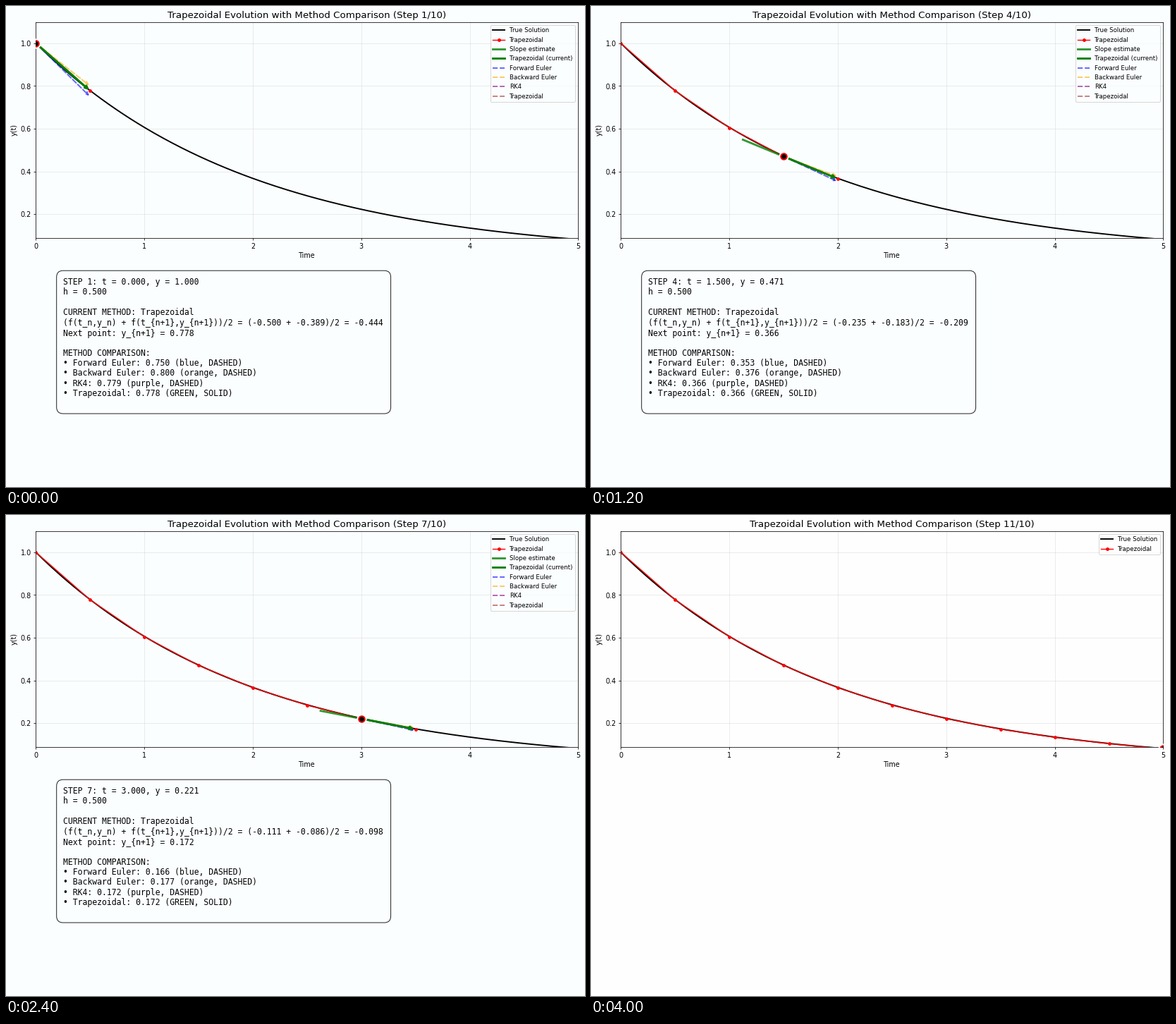
Write a matplotlib script that moves like this. It is 821 px wide and 682 px high and loops after 4400 ms.

```python
import numpy as np
import matplotlib.pyplot as plt
from matplotlib.animation import FuncAnimation
from matplotlib.patches import FancyBboxPatch

W, H, DPI = 821, 682, 69
STEPS, STEP_H = 10, 0.5
LEFT, RIGHT, TOP, BOTTOM = 42.4, 811.4, 22.6, 328.9

plt.rcParams.update({"font.family": "DejaVu Sans", "font.size": 10})

z = -0.5 * STEP_H
GROWTH = {
    "Forward Euler": 1 + z,
    "Backward Euler": 1 / (1 - z),
    "RK4": 1 + z + z**2 / 2 + z**3 / 6 + z**4 / 24,
    "Trapezoidal": (1 + z / 2) / (1 - z / 2),
}
COLORS = {"Forward Euler": "blue", "Backward Euler": "orange",
          "RK4": "purple", "Trapezoidal": "brown"}

times = STEP_H * np.arange(STEPS + 1)
values = GROWTH["Trapezoidal"] ** np.arange(STEPS + 1)
fine_t = np.linspace(0, 5, 300)

fig = plt.figure(figsize=((W + 0.01) / DPI, (H + 0.01) / DPI), dpi=DPI)
ax = fig.add_axes([LEFT / W, 1 - BOTTOM / H, (RIGHT - LEFT) / W, (BOTTOM - TOP) / H])
panel = fig.add_axes([0, 0, 1, 1])


def slope(y):
    return -0.5 * y


def report(n):
    t, y, y_next = times[n], values[n], values[n + 1]
    f0, f1 = slope(y), slope(y_next)
    lines = [
        f"STEP {n + 1}: t = {t:.3f}, y = {y:.3f}",
        f"h = {STEP_H:.3f}",
        "",
        "CURRENT METHOD: Trapezoidal",
        f"(f(t_n,y_n) + f(t_{{n+1}},y_{{n+1}}))/2 = ({f0:.3f} + {f1:.3f})/2 = {(f0 + f1) / 2:.3f}",
        f"Next point: y_{{n+1}} = {y_next:.3f}",
        "",
        "METHOD COMPARISON:",
    ]
    for name, growth in GROWTH.items():
        style = "GREEN, SOLID" if name == "Trapezoidal" else f"{COLORS[name]}, DASHED"
        lines.append(f"• {name}: {y * growth:.3f} ({style})")
    return lines


def draw_panel(n, paper):
    x0, y0, x1, y1, radius = 71.7, 375.2, 545.6, 578.0, 9.2
    panel.add_patch(FancyBboxPatch(
        (x0, y0), x1 - x0, y1 - y0, fc=paper, ec="black", lw=1, alpha=0.9,
        boxstyle=f"round,pad=0,rounding_size={radius}"))
    baseline = 395
    for row, line in enumerate(report(n)):
        panel.text(80.8, baseline, line, fontsize=12, family="DejaVu Sans Mono",
                   va="baseline")
        # rows with braces are slightly taller
        baseline += 14.92 if row in (3, 4) else 14.22


def arrow(n, growth, **style):
    start = times[n], values[n]
    end = times[n + 1], values[n] * growth
    ax.annotate("", xy=end, xytext=start, arrowprops=dict(arrowstyle="->", **style))


def draw_step(n):
    t, y = times[n], values[n]
    reach = 0.75 * STEP_H
    mean_slope = (slope(y) + slope(values[n + 1])) / 2
    ax.plot([t - reach, t + reach], [y - reach * mean_slope, y + reach * mean_slope],
            color="green", lw=3, alpha=0.8, label="Slope estimate")
    ax.plot([], [], color="green", lw=3, label="Trapezoidal (current)")
    for name, growth in GROWTH.items():
        style = dict(color=COLORS[name], lw=2, ls="--", alpha=0.6)
        ax.plot([], [], label=name, **style)
        if name != "Trapezoidal":
            arrow(n, growth, **style)
    arrow(n, GROWTH["Trapezoidal"], color="green", lw=3)
    ax.plot(times[n + 1], values[n + 1], "o", color="red", ms=4, zorder=4)


def update(n):
    running = n < STEPS
    paper = "#fbfeff" if running else "#fefefe"
    fig.set_facecolor(paper)
    ax.clear()
    ax.set_facecolor(paper)
    panel.clear()
    panel.set(xlim=(0, W), ylim=(H, 0))
    panel.axis("off")

    ax.plot(fine_t, np.exp(-0.5 * fine_t), color="black", lw=2, label="True Solution")
    ax.plot(times[:n + 1], values[:n + 1], "o-", color="red", lw=1.5, ms=4,
            label="Trapezoidal")
    if running:
        draw_step(n)
        draw_panel(n, paper)
    ax.scatter(times[n], values[n], s=220, color=paper, lw=0, zorder=10)
    ax.scatter(times[n], values[n], s=80, color="black", edgecolor="red", lw=2, zorder=11)

    ax.set(xlim=(0, 5), ylim=(1.1 * values[-1], 1.1), xlabel="Time", ylabel="y(t)")
    ax.set_title(f"Trapezoidal Evolution with Method Comparison (Step {n + 1}/{STEPS})",
                 fontsize=14)
    ax.grid(alpha=0.3)
    ax.legend(loc="upper right", fontsize=9, facecolor=paper)


anim = FuncAnimation(fig, update, frames=STEPS + 1, interval=400, repeat=True)
plt.show()
```
